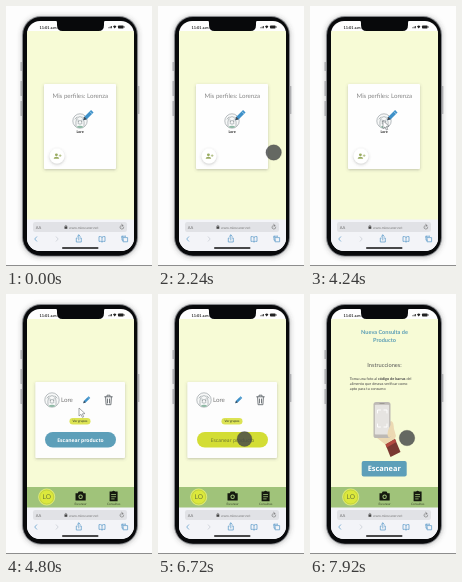
Write an HTML page that moves like this. It is 146 by 260 pixels and loops after 8000 ms.

```html
<!DOCTYPE html>
<html lang="es">
<head>
<meta charset="utf-8">
<title>Perfiles</title>
<style>
  html, body { margin: 0; width: 100%; height: 100%; overflow: hidden; background: #fdfdfd; }
  svg { display: block; width: 100vw; height: 100vh; }
  text { font-family: Lato, "Open Sans", sans-serif; fill: #777; text-rendering: geometricPrecision; }
  .mid { text-anchor: middle; }
  .bold { font-family: "Open Sans", "Noto Sans", sans-serif; font-weight: 700; }
  .tiny { font-size: 3.1px; fill: #38452a; }
  .line { fill: none; stroke-linecap: round; stroke-linejoin: round; }
  .blue { stroke: #5f9cca; stroke-width: .75; }
</style>
</head>
<body>
<svg viewBox="0 0 146 260">
  <defs>
    <clipPath id="screen"><rect x="21" y="15" width="107" height="230" rx="13"/></clipPath>
    <filter id="shadow" x="-20%" y="-20%" width="140%" height="150%">
      <feDropShadow dx="0" dy="1" stdDeviation="1.4" flood-color="#555" flood-opacity=".32"/>
    </filter>
    <filter id="halo" x="-20%" y="-10%" width="140%" height="120%">
      <feDropShadow dx="0" dy=".5" stdDeviation="2.6" flood-color="#444" flood-opacity=".4"/>
    </filter>
    <g id="face">
      <circle r="7.2" fill="#f7f8f8" stroke="#9ba3a6" stroke-width=".7"/>
      <path class="line" stroke="#8a9498" stroke-width=".6" d="M-4 4.8Q-5-4 0-4.4Q5-4 4 4.8M-2.5-1Q0 1 2.5-1M-2 2.6Q0 4 2 2.6M-5-2L-3-4M5-2L3-4"/>
      <circle cx="-1.7" cy=".8" r=".6" fill="#596468"/>
      <circle cx="1.7" cy=".8" r=".6" fill="#596468"/>
      <path d="M-3.8 6Q0 3.5 3.8 6Q0 8 -3.8 6" fill="#8fb9a5"/>
    </g>
    <g id="pencil">
      <path d="M-4 4L-3.2 1.2L2.2-4.2L4.2-2.2L-1.2 3.2Z" fill="#3f91c9"/>
      <path d="M-4 4L-3.2 1.2L-1.2 3.2Z" fill="#414b55"/>
      <path d="M1.1-3.1L3.1-1.1" stroke="#b9ddf1" stroke-width=".6"/>
    </g>
  </defs>

  <!-- phone body -->
  <g fill="#c4c5c8">
    <rect x="14.4" y="56" width="2" height="9" rx=".6"/>
    <rect x="14.4" y="75" width="2" height="15" rx=".6"/>
    <rect x="14.4" y="95" width="2" height="15" rx=".6"/>
    <rect x="131.4" y="80" width="2" height="28" rx=".6"/>
  </g>
  <rect x="16" y="10" width="116" height="240.6" rx="19" fill="#85878b" filter="url(#halo)"/>
  <rect x="17" y="10.9" width="114" height="238.8" rx="18" fill="#08090b"/>

  <g clip-path="url(#screen)">
    <rect x="21" y="15" width="107" height="230" fill="#fefefe"/>
    <rect x="21" y="25" width="107" height="189" fill="#f7fbd6"/>

    <g id="profiles">
      <rect x="38" y="78" width="72" height="85" rx="1" fill="#fefefe" filter="url(#shadow)"/>
      <text class="mid" x="74.3" y="92" font-size="6.2" style="fill:#858585">Mis perfiles: Lorenza</text>
      <use href="#face" x="74" y="115"/>
      <use href="#pencil" transform="translate(82.3 109.3) scale(1.25)"/>
      <text class="mid" x="74" y="126.7" font-size="3.7" font-weight="700" style="fill:#222">Lore</text>
      <circle cx="51" cy="150" r="7.4" fill="#fff" filter="url(#shadow)"/>
      <g transform="translate(51.2 150.2) scale(.8)" fill="#9aac62">
        <circle cx="-1" cy="-1.7" r="1.8"/>
        <path d="M-4.5 3.2Q-4.3.8-1 .8T2.5 3.2Z"/>
        <path d="M2-.7h3.4M3.7-2.4v3.4" stroke="#9aac62" stroke-width=".8"/>
      </g>
    </g>

    <g id="detail">
      <rect x="29.4" y="88" width="89.6" height="76" rx="1" fill="#fdfdfd" filter="url(#shadow)"/>
      <use href="#face" x="46" y="106"/>
      <text x="55" y="108.2" font-size="6.2">Lore</text>
      <use href="#pencil" transform="translate(80.7 105.8) scale(.85)"/>
      <g class="line" stroke="#666b70" stroke-width=".9">
        <path d="M98.7 102.8h7.6M101 102.5v-1.3h3v1.3M99.6 103l.5 7.7h4.8l.5-7.7M101.5 105v4M103.5 105v4"/>
      </g>
      <rect x="63.5" y="124" width="21" height="6.6" rx="3.3" fill="#dce354"/>
      <text class="mid" x="74" y="128.4" font-size="3.1" font-weight="700" style="fill:#4c542d">Ver grupos</text>
      <rect id="pill" x="39" y="138" width="71" height="15.6" rx="7.8"/>
      <text id="pillText" class="mid bold" x="74.5" y="147.7" font-size="5">Escanear producto</text>
    </g>

    <g id="guide">
      <g class="mid bold" font-size="5.6">
        <text x="74.5" y="40.3" style="fill:#5a9db5">Nueva Consulta de</text>
        <text x="74.5" y="47.8" style="fill:#5a9db5">Producto</text>
      </g>
      <text class="mid" x="74.5" y="73" font-size="5.7" style="fill:#555">Instrucciones:</text>
      <g font-size="3.75">
        <text x="39.8" y="86.3" style="fill:#444">Toma una foto al <tspan font-weight="700">código de barras</tspan> del</text>
        <text x="39.8" y="91" style="fill:#444">alimento que deseas verificar como</text>
        <text x="39.8" y="95.8" style="fill:#444">apto para tu consumo</text>
      </g>
      <path d="M70 137L81 127Q84 128 83.5 133L86 142L83 149L76 151L67 144Q66 140 70 137Z" fill="#ecd9b2"/>
      <rect x="63.5" y="108" width="17" height="36" rx="2.6" fill="#bdb9b4"/>
      <rect x="64.9" y="110.8" width="14.2" height="29.8" rx=".8" fill="#e6e4e1"/>
      <path class="line" stroke="#fff" stroke-width=".9" d="M67.5 119v-3h3M74 116h3v3M67.5 130v3h3M74 133h3v-3"/>
      <path d="M69.5 109.5h5" stroke="#918d89" stroke-width=".7"/>
      <path d="M79 134Q81.5 128 83.5 132L83.5 139L79 144Q76 141 79 134" fill="#ecd9b2"/>
      <path d="M75.5 150.5L85 145L90.5 158L80.5 163Z" fill="#7a3831"/>
      <path d="M75.5 150.5L85 145L86.3 148L76.7 153.5Z" fill="#b34a40"/>
      <rect x="51.7" y="167" width="45" height="15.4" rx="2" fill="#5d9fb9"/>
      <text class="mid bold" x="74.2" y="177.3" font-size="7.4" style="fill:#fff">Escanear</text>
    </g>

    <g id="nav">
      <rect x="21" y="193" width="107" height="21" fill="#a0c37a"/>
      <circle cx="40.7" cy="203" r="8.1" fill="#dce83c" stroke="#e8f08a" stroke-width=".7"/>
      <circle cx="40.7" cy="203" r="7" fill="none" stroke="#a9bf43" stroke-width=".5"/>
      <text class="mid" x="40.7" y="205.3" font-size="6.6" style="fill:#6b7a35">LO</text>
      <g fill="#15190f">
        <path d="M69.5 199.2h2.2l1-1.7h3.8l1 1.7h2.2v7.3h-10.2Z"/>
        <circle cx="74.6" cy="202.7" r="2.2" fill="#a0c37a"/>
        <circle cx="74.6" cy="202.7" r="1.2"/>
        <path d="M103.6 197.6h2.4q1.6-1.8 3.2 0h2.4v9.6h-8Z"/>
      </g>
      <path d="M105.2 200.5h4.8M105.2 202.7h4.8M105.2 204.9h3.4" stroke="#a0c37a" stroke-width=".8"/>
      <text class="mid tiny" x="74.6" y="211.4">Escanear</text>
      <text class="mid tiny" x="107.6" y="211.4">Consultas</text>
    </g>

    <!-- browser bar -->
    <rect x="21" y="213.5" width="107" height="31.5" fill="#f3f4f8"/>
    <rect x="27" y="216" width="94" height="10" rx="2.2" fill="#e1e2e6"/>
    <text x="29.8" y="222.7" font-size="4" style="fill:#666">AA</text>
    <rect x="58.5" y="220.6" width="2.8" height="2.2" fill="#444"/>
    <path class="line" stroke="#444" stroke-width=".5" d="M59.1 220.6v-.8q.8-1.2 1.6 0v.8"/>
    <text x="63" y="222.7" font-size="3.4" style="fill:#777">www.miescaner.net</text>
    <path class="line" stroke="#666" stroke-width=".55" d="M117 219.6A1.9 1.9 0 1 0 117.8 221.2M115.8 218.4l1.4 1.2-1.4 1"/>
    <g class="line blue">
      <path d="M30.7 230.8L28.7 233L30.7 235.2"/>
      <path d="M50.2 230.8L52.2 233L50.2 235.2" stroke="#c8cdd5"/>
      <path d="M71.3 232h-1v4h5v-4h-1M72.8 234v-5M71.4 230.3l1.4-1.4 1.4 1.4"/>
      <path d="M96 231.2q-1.5-1-3-.6v4.8q1.5-.4 3 .5q1.5-.9 3-.5v-4.8q-1.5-.4-3 .6v4.7"/>
      <path d="M116 231.5v-1.3h4v0M116 230.2v4h1.3M117.4 231.6h4.2v4.2h-4.2Z"/>
    </g>
    <rect x="56" y="241.3" width="36.5" height="1.4" rx=".7" fill="#111"/>

    <!-- status bar -->
    <text x="33.5" y="22.7" font-size="3.9" font-weight="700" style="fill:#222">11:01 a.m.</text>
    <g fill="#222">
      <path d="M102.5 22.3h.8v-1h-.8ZM103.8 22.3h.8v-1.7h-.8ZM105.1 22.3h.8v-2.4h-.8Z"/>
      <path d="M107 20.4q1.7-1.6 3.4 0l-1.7 2Z"/>
      <rect x="112" y="19.6" width="5.6" height="2.8" rx=".7"/>
      <rect x="118" y="20.4" width=".6" height="1.2"/>
    </g>
    <path d="M47.5 14Q51 14 51 17V19Q51 25 56.5 25H92.5Q98 25 98 19V17Q98 14 101.5 14Z" fill="#08090b"/>

    <circle id="touch" r="7.8" fill="#46484a" fill-opacity=".82" stroke="#333" stroke-opacity=".35" stroke-width=".6"/>
    <path id="arrow" d="M0 0V8L2 6.3L3.4 9.4L4.7 8.8L3.4 5.8L6 5.6Z" fill="#fff" stroke="#6b7075" stroke-width=".6"/>
  </g>
  <rect y="259" width="146" height="1" fill="#8d8d8d"/>
</svg>
<script>
  const LOOP = 8000, STEP = 80;
  const el = id => document.getElementById(id);
  const [profiles, detail, guide, nav, pill, pillText, touch, arrow] =
    ["profiles", "detail", "guide", "nav", "pill", "pillText", "touch", "arrow"].map(el);

  // pointer: time, x, y, scale
  const path = [
    [1920, 134, 160, 1], [2800, 73, 115, 1], [3680, 73, 115, 1], [3760, 73, 115, .92],
    [3840, 73, 115, 1], [4000, 73, 115, 1], [4560, 73, 114, 1], [4880, 73, 114, 1],
    [5600, 111, 131, 1], [5680, 111, 131, 1], [6400, 86.5, 145, 1], [6640, 86.5, 145, 1],
    [6720, 86.5, 145, .96], [6960, 86.5, 145, 1], [7680, 97, 144, 1], [8000, 97, 144, 1]
  ];

  const ease = p => p * p * (3 - 2 * p);
  const within = (t, a, b) => t >= a && t < b;
  const show = (node, on) => { node.style.display = on ? "" : "none"; };
  const mix = (a, b, p) => `rgb(${a.map((v, i) => Math.round(v + (b[i] - v) * p))})`;

  function pointerAt(t) {
    const i = path.findIndex(k => k[0] > t);
    if (i < 1) return path[0].slice(1);
    const a = path[i - 1], b = path[i];
    const p = ease((t - a[0]) / (b[0] - a[0]));
    return a.slice(1).map((v, n) => v + (b[n + 1] - v) * p);
  }

  function draw(now) {
    const t = Math.floor((now % LOOP) / STEP) * STEP;
    show(profiles, t < 4720);
    show(detail, within(t, 4720, 6960));
    show(guide, t >= 6960);
    show(nav, t >= 4720);

    const hover = t < 6480 ? 0 : t < 6560 ? .5 : 1;
    pill.style.fill = mix([93, 159, 185], [211, 221, 53], hover);
    pillText.style.fill = mix([255, 255, 255], [104, 114, 48], hover);
    pillText.style.fontWeight = hover ? 400 : 700;

    const asArrow = within(t, 4000, 5120);
    const [x, y, s] = pointerAt(t);
    show(touch, t >= 1920 && !asArrow);
    show(arrow, asArrow);
    (asArrow ? arrow : touch).setAttribute("transform", `translate(${x} ${y}) scale(${s})`);
  }

  function tick() {
    draw(performance.now());
    requestAnimationFrame(tick);
  }
  tick();
</script>
</body>
</html>
```
